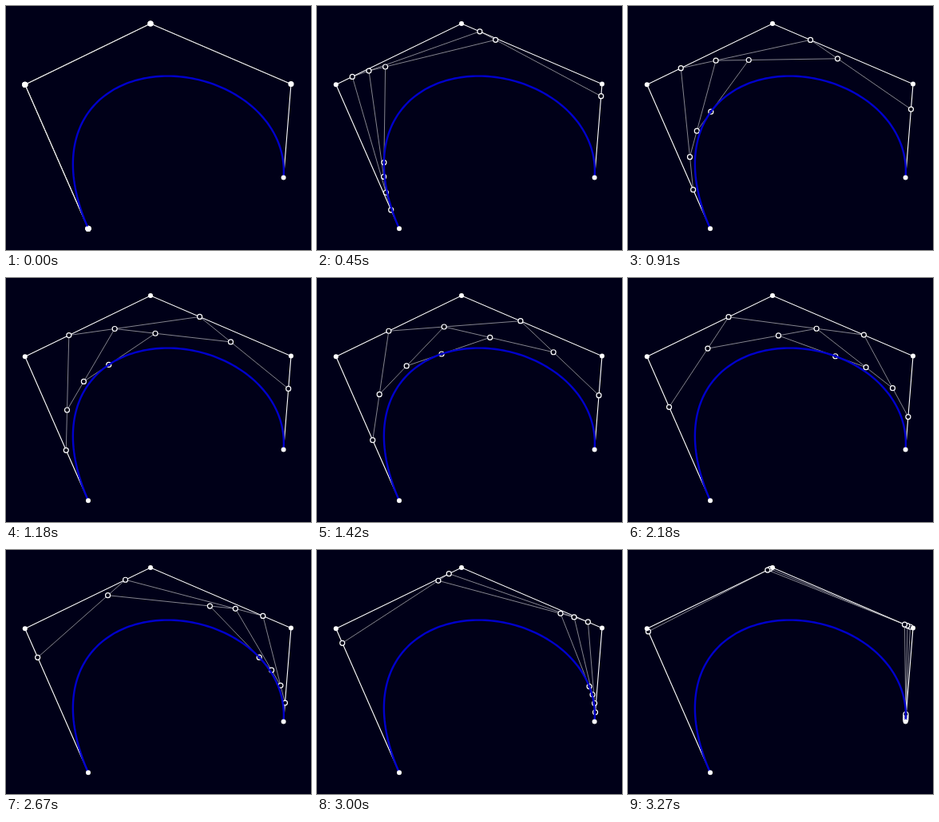
Write an HTML page with a canvas that moves like this. It is 382x305 px and loops after 3.3 s.

```html
<!DOCTYPE html>
<html lang="en">
<head>
<meta charset="utf-8">
<title>Quartic curve construction</title>
<style>
html, body { margin: 0; width: 100%; height: 100%; overflow: hidden; background: #000018; }
canvas { display: block; }
</style>
</head>
<body>
<canvas width="382" height="305"></canvas>
<script>
const LOOP = 3300, BG = '#000018';
const ctx = document.querySelector('canvas').getContext('2d');
const control = [[103, 278.3], [23.8, 98.3], [181, 22], [357, 97.5], [347.6, 214.5]];

// One round of de Casteljau's algorithm
const reduce = (pts, t) => pts.slice(1).map((p, i) =>
  p.map((v, k) => pts[i][k] + (v - pts[i][k]) * t));

// All levels below the control polygon, ending with the curve point
function levelsAt(t) {
  const levels = [];
  for (let pts = control; pts.length > 1;) levels.push(pts = reduce(pts, t));
  return levels;
}

const curve = Array.from({ length: 121 }, (_, i) => levelsAt(i / 120)[3][0]);

function line(pts, color, width) {
  ctx.beginPath();
  pts.forEach(p => ctx.lineTo(...p));
  ctx.strokeStyle = color;
  ctx.lineWidth = width;
  ctx.stroke();
}

function dot([x, y], fill) {
  ctx.beginPath();
  ctx.arc(x, y, 3, 0, 2 * Math.PI);
  ctx.fillStyle = fill;
  ctx.fill();
}

function ring(p) {
  dot(p, BG);
  ctx.strokeStyle = '#fff';
  ctx.lineWidth = 1.2;
  ctx.stroke();
}

function draw(now) {
  const t = Math.floor((now % LOOP) * 0.03) / 100;
  const levels = levelsAt(t);
  ctx.fillStyle = BG;
  ctx.fillRect(0, 0, 382, 305);
  line(control, '#fff', 1.1);
  levels.forEach(pts => line(pts, '#ddd', 0.6));
  levels.flat().forEach(ring);
  line(curve, '#0000cc', 2.4);
  control.forEach(p => dot(p, '#fff'));
}

const start = performance.now();
function tick() {
  draw(performance.now() - start);
  requestAnimationFrame(tick);
}
tick();
</script>
</body>
</html>
```
